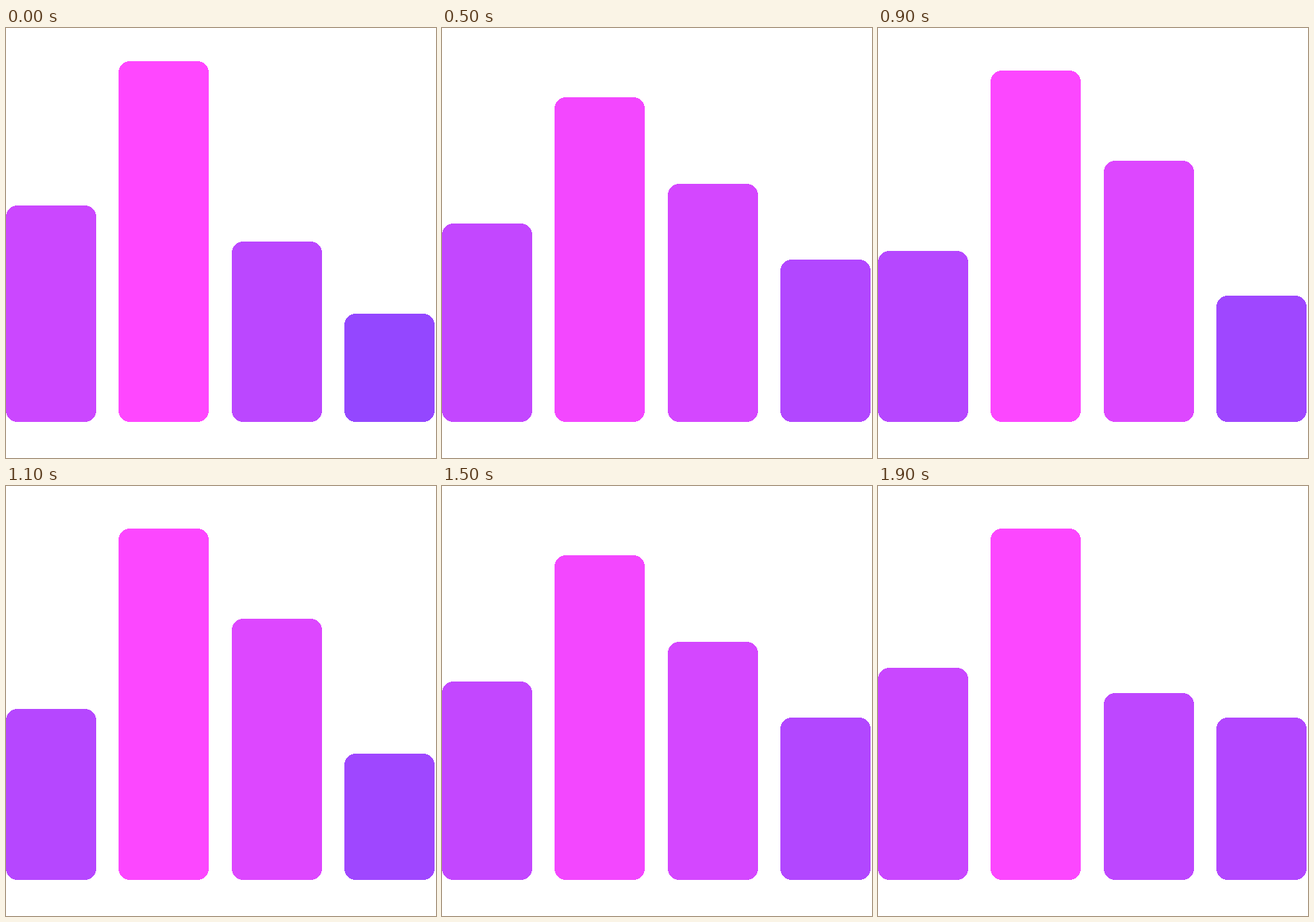
These frames come from a looping animation (596 by 596 pixels, 2 s). An HTML page:

```html
<!DOCTYPE html>
<html lang="en">
<head>
<meta charset="utf-8">
<title>Equalizer bars</title>
<style>
  html, body { margin: 0; height: 100%; overflow: hidden; background: #fff; }
  svg { display: block; width: 596px; height: 596px; }
</style>
</head>
<body>
<svg id="stage" viewBox="0 0 596 596" shape-rendering="crispEdges"></svg>
<script>
const BASELINE = 546, FULL_HEIGHT = 500, BAR_WIDTH = 125, PITCH = 156.25;
const LOOP = 2000, STEP = 100, KEY_SPACING = 200;

// Bar levels (percent) every 200 ms; the sequence plays forward, then back.
const LEVELS = [
  [60, 100, 50, 30],
  [57.5, 95, 53.5, 60],
  [70, 100, 60, 40],
  [40, 80, 72, 50],
  [50, 100, 63, 30],
  [45, 95, 82, 40]
];

const stage = document.getElementById('stage');
const bars = LEVELS[0].map((_, i) => {
  const bar = document.createElementNS(stage.namespaceURI, 'rect');
  bar.setAttribute('x', Math.round(i * PITCH));
  bar.setAttribute('width', BAR_WIDTH);
  bar.setAttribute('rx', 15.6);
  return stage.appendChild(bar);
});

function levelAt(bar, time) {
  const position = Math.min(time, LOOP - time) / KEY_SPACING;
  const index = Math.min(Math.floor(position), LEVELS.length - 2);
  const from = LEVELS[index][bar], to = LEVELS[index + 1][bar];
  return (from + (to - from) * (position - index)) / 100;
}

function draw(now) {
  const time = Math.floor((now % LOOP) / STEP) * STEP;
  bars.forEach((bar, i) => {
    const level = levelAt(i, time);
    const top = Math.round(BASELINE - FULL_HEIGHT * level);
    const red = Math.round(255 * level ** 0.45); // gamma-encoded level
    bar.setAttribute('y', top);
    bar.setAttribute('height', BASELINE - top);
    bar.setAttribute('fill', `rgb(${red}, 71, 255)`);
  });
}

const start = performance.now();
function tick() {
  draw(performance.now() - start);
  requestAnimationFrame(tick);
}
tick();
</script>
</body>
</html>
```
